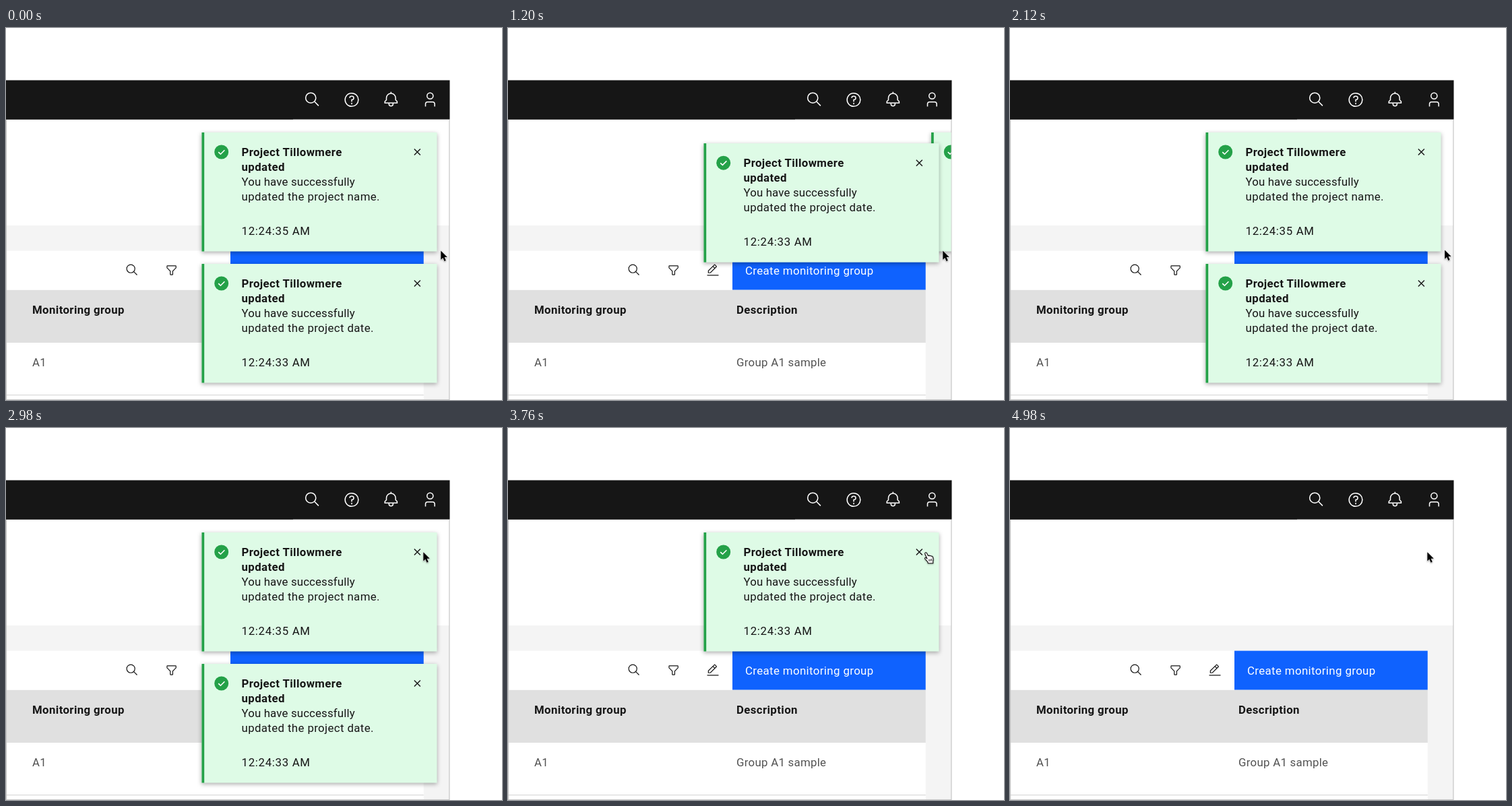
These frames come from a looping animation (736x552 px, 5300 ms). An HTML page:

```html
<!DOCTYPE html>
<html lang="en">
<head>
<meta charset="utf-8">
<title>Toast notifications</title>
<style>
  html, body { margin: 0; width: 100%; height: 100%; overflow: hidden; background: #fff; }
  svg { display: block; }
  text { font: 16.8px Roboto, "Noto Sans", sans-serif; letter-spacing: .3px; fill: #161616; }
  .bold { font-weight: 600; letter-spacing: .4px; }
  .soft { fill: #525252; }
  .icon { fill: none; stroke: #161616; stroke-width: 2; }
  .light { stroke: #fff; }
  .toast { filter: drop-shadow(0 2px 3px #0005); }
  .pointer { filter: drop-shadow(0 1px 1px #0005); }
</style>
</head>
<body>
<svg id="stage" width="736" height="552" viewBox="0 0 736 552"></svg>
<script>
const LOOP = 5300, TRAVEL = 368, STEP = 195;
const TITLE = ["Project Tillowmere", "updated"];

const icons = {
  search: '<circle cx="13" cy="13" r="10"/><path d="M20.4 20.4l8 8"/>',
  help: '<circle cx="16" cy="16" r="13"/><path d="M12 12.5a3.5 3.5 0 0 1 3.5-3.5h1a3.5 3.5 0 0 1 0 7H16v4M16 22v3"/>',
  bell: '<path d="M16 1v3M4 23v-3l3-3v-4a9 9 0 0 1 18 0v4l3 3v3zM12 24v1a4 4 0 0 0 8 0v-1"/>',
  user: '<circle cx="16" cy="9" r="6"/><path d="M25 30v-5a4 4 0 0 0-4-4H11a4 4 0 0 0-4 4v5"/>',
  filter: '<path d="M5 6a1 1 0 0 1 1-1h20a1 1 0 0 1 1 1v4l-8 8v8a1 1 0 0 1-1 1h-4a1 1 0 0 1-1-1v-8l-8-8z"/>',
  edit: '<path d="M5 23v-5L19.8 3.4a.9.9 0 0 1 1.2 0l3.6 3.6a.9.9 0 0 1 0 1.2L9.8 23zM16 7l5 5M2 29h28"/>'
};

const rect = (x, y, w, h, fill) =>
  `<rect x="${x}" y="${y}" width="${w}" height="${h}" fill="${fill}"/>`;
const label = (x, y, text, cls = "", extra = "") =>
  `<text x="${x}" y="${y}" class="${cls}" ${extra}>${text}</text>`;
const icon = (name, x, y, scale, cls = "") =>
  `<g class="icon ${cls}" transform="translate(${x} ${y}) scale(${scale}) translate(-16 -16)">${icons[name]}</g>`;
const badge = (x, y, scale = 1) =>
  `<g transform="translate(${x} ${y}) scale(${scale})"><circle r="10.5" fill="#24a148"/>
   <path d="M-4.5 .2l3.2 3L4.7-2.8" fill="none" stroke="#fff" stroke-width="1.6"/></g>`;
const title = (size, y, gap, spacing) => TITLE.map((line, i) =>
  label(59, y + gap * i, line, "bold", `style="font-size:${size}px;letter-spacing:${spacing}px"`)).join("");

// Toast local origin is its top left corner; "morph" parts show only while it enters.
const toast = (id, field, time, resizes) => `
  <g id="${id}" class="toast">
    ${rect(0, 0, 349, 176.5, "#defbe6")}
    <g class="rest">
      ${resizes ? rect(0, 0, 3.7, 176.5, "#24a148") + badge(29.2, 29) : ""}
      ${title(16.8, 35, 22, .4)}
    </g>
    <g class="morph">
      ${resizes ? `<g opacity=".45">${rect(0, 0, 3.7, 176.5, "#24a148")}${badge(30, 29.5)}</g>
        ${rect(0, 0, 3.7, 144.5, "#24a148")}${badge(27.5, 27.5, .86)}` : ""}
      <g class="small">${title(15.6, 34.5, 20, .3)}</g>
      <g class="large">${title(18.8, 37.5, 24.5, .5)}</g>
    </g>
    ${resizes ? "" : rect(0, 0, 3.7, 176.5, "#24a148") + badge(29.2, 29)}
    ${label(59, 79, "You have successfully", "", 'style="letter-spacing:.17px"')}
    ${label(59, 101, `updated the project ${field}.`, "", 'style="letter-spacing:.4px"')}
    ${label(59, 152, time, "", 'style="letter-spacing:.7px"')}
    <path d="M315.3 24.5l9 9m0-9l-9 9" stroke="#161616" stroke-width="1.4"/>
  </g>`;

const stage = document.getElementById("stage");
stage.innerHTML = `
  <clipPath id="panel">${rect(0, 136, 657.5, 416, "#000")}</clipPath>
  ${rect(0, 293, 658, 259, "#f4f4f4")}
  ${rect(0, 330.6, 333, 58.4, "#fff")}
  ${rect(333, 330.6, 286.7, 58, "#0f62fe")}
  ${rect(0, 388.8, 619.7, 78.2, "#e0e0e0")}
  ${rect(0, 467, 619.7, 85, "#fff")}
  ${rect(0, 544, 619.7, 1.2, "#d8d8d8")}
  <path d="M.5 136V551.5H657.9V136" fill="none" stroke="#c6c6c6" stroke-width="1.2"/>
  ${rect(0, 77.5, 658.5, 57.5, "#161616")}
  ${rect(0, 135, 426, 1, "#393939")}
  ${rect(426, 135, 232.5, 1, "#6f6f6f")}
  ${icon("search", 454.5, 106, .757, "light")}
  ${icon("help", 513, 106.5, .757, "light")}
  ${icon("bell", 571.3, 106, .757, "light")}
  ${icon("user", 629.3, 106, .757, "light")}
  ${icon("search", 187, 359, .605)}
  ${icon("filter", 245.6, 359.5, .605)}
  ${icon("edit", 304, 359, .605)}
  ${label(352, 366, "Create monitoring group", "", 'style="fill:#fff;letter-spacing:.4px"')}
  ${label(39, 424, "Monitoring group", "bold")}
  ${label(339, 424, "Description", "bold")}
  ${label(39, 501.5, "A1", "soft")}
  ${label(339, 501.5, "Group A1 sample", "soft")}
  <g clip-path="url(#panel)">
    ${toast("name", "name", "12:24:35 AM", false)}
    ${toast("date", "date", "12:24:33 AM", true)}
  </g>
  <g id="cursor" class="pointer" stroke-linejoin="round">
    <path id="arrow" d="M0 0v13.2l3-2.8 2.2 5 2.3-1-2.2-4.9h4.2z" fill="#000" stroke="#fff" stroke-width="1" paint-order="stroke"/>
    <g id="hand" fill="#fff" stroke="#111" stroke-width="1.1">
      <path d="M4 16.5l-.5-2.2-4-4.3c-1-1.4.5-2.5 1.8-1.5l1.4 1.2-3.2-7C-1.1 1 1-.3 2 1.2l2.2 4.3c.7-1 2-.9 2.5.1.8-.8 1.9-.5 2.3.5.9-.5 1.8 0 2 .9 1 2.7 1.4 4.6.3 6.6l.2 2.9z"/>
      <path d="M5.3 10.5l.5 3M7.3 10.2l.5 3M9.2 9.9l.4 3" stroke-width=".9"/>
    </g>
  </g>`;

const find = id => document.getElementById(id);
const ramp = (t, from, to) => Math.min(1, Math.max(0, (t - from) / (to - from)));
const mix = (a, b, k) => a + (b - a) * k;

function place(id, x, y, opacity, entering) {
  const el = find(id), part = cls => el.querySelector(cls);
  const morphing = entering > 0 && entering < 1;
  el.setAttribute("transform", `translate(${290.5 + x} ${155 + y})`);
  el.style.opacity = opacity;
  el.style.display = x < TRAVEL && opacity > 0 ? "" : "none";
  part(".rest").style.display = morphing ? "none" : "";
  part(".morph").style.display = morphing ? "" : "none";
  part(".small").style.opacity = 1 - entering * .75;
  part(".large").style.opacity = entering * .9;
}

function draw(t) {
  const opening = t < 260;
  const opacity = opening ? 1 - ramp(t, 130, 260) : 1;
  const dateIn = opening ? 1 : ramp(t, 647, 797);
  const nameIn = opening ? 1 : ramp(t, 1177, 1467);
  const nameOut = ramp(t, 3210, 3500);
  const dateOut = ramp(t, 3990, 4280);
  place("date", TRAVEL * (1 - dateIn + dateOut), STEP * (nameIn - nameOut), opacity, dateIn);
  place("name", TRAVEL * (1 - nameIn + nameOut), 0, opacity, nameIn);

  const move = (1 - Math.cos(Math.PI * ramp(t, 2100, 2520))) / 2;
  find("cursor").setAttribute("transform", `translate(${mix(645.3, 619.3, move)} ${mix(330.5, 184.3, move)})`);
  const hand = ramp(t, 3105, 3180) - ramp(t, 4405, 4440);
  find("hand").style.opacity = hand;
  find("arrow").style.opacity = 1 - hand;
}

function tick() {
  draw(performance.now() % LOOP);
  requestAnimationFrame(tick);
}
tick();
</script>
</body>
</html>
```
